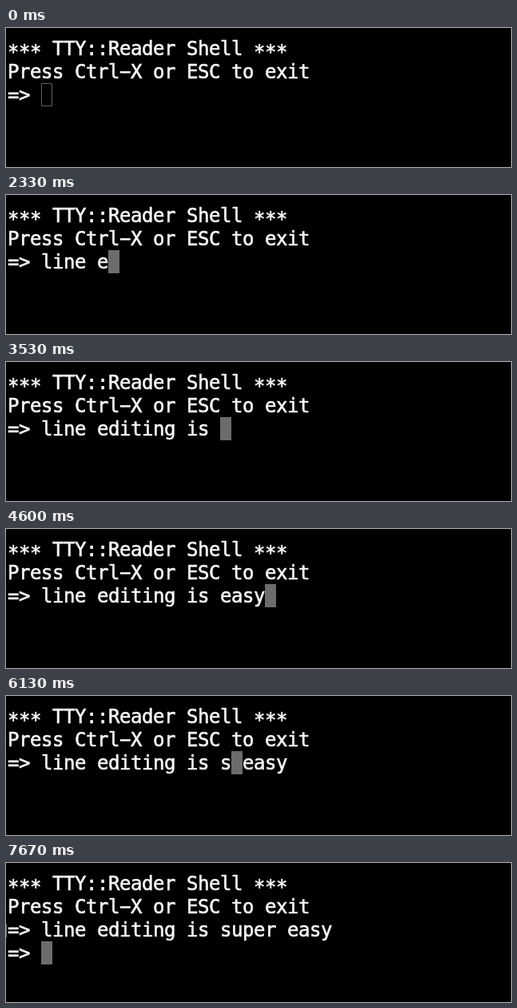
An HTML page with a canvas that plays this animation: 632x174 px, repeating every 8000 ms.

```html
<!DOCTYPE html>
<html lang="en">
<head>
<meta charset="utf-8">
<style>
  html, body { margin: 0; width: 100%; height: 100%; overflow: hidden; background: #000; }
  canvas { display: block; }
</style>
</head>
<body>
<canvas id="stage" width="632" height="174"></canvas>
<script>
const ctx = document.getElementById('stage').getContext('2d');
const LOOP = 8000, LEFT = 2, TOP = 11, CELL = 14, LINE = 29, BASELINE = 23;
const PROMPT = '=> ';
const FOCUS = 470, SUBMIT = 7600, POINTER = 7670;

// [time, keys]: '<' moves the cursor left, anything else is inserted
const KEYS = [
  [1470, 'li'], [1530, 'n'], [2000, 'e'], [2130, ' '], [2330, 'e'],
  [2530, 'd'], [2600, 'i'], [2730, 't'], [2800, 'i'], [2930, 'ng'], [3000, ' '],
  [3270, 'i'], [3330, 's'], [3530, ' '],
  [3730, 'e'], [3800, 'a'], [3930, 's'], [4070, 'y'],
  [4730, '<'], [4930, '<'], [5000, '<'], [5130, '<'], [5270, '<'],
  [5800, ' '], [6130, 's'], [6270, 'up'], [6330, 'e'], [6470, 'r'],
];

function editLine(time) {
  let text = '', pos = 0;
  for (const [at, keys] of KEYS) {
    if (at > time) break;
    for (const key of keys) {
      if (key === '<') { pos--; continue; }
      text = text.slice(0, pos) + key + text.slice(pos);
      pos++;
    }
  }
  return { text, pos };
}

function print(text, row) {
  ctx.fillStyle = ctx.strokeStyle = '#f8f8f8';
  ctx.lineWidth = 0.6; // slightly heavier than the regular weight
  [...text].forEach((char, col) => {
    const x = LEFT + col * CELL;
    const y = TOP + row * LINE + BASELINE + (char === '*' ? 3.5 : 0); // asterisks sit mid-line
    ctx.fillText(char, x, y);
    ctx.strokeText(char, x, y);
  });
}

function drawCursor(col, row, focused) {
  const x = LEFT + col * CELL, y = TOP + row * LINE;
  ctx.fillStyle = ctx.strokeStyle = focused ? '#6c6c6c' : '#606060';
  ctx.lineWidth = 1;
  if (focused) ctx.fillRect(x, y, CELL, LINE);
  else ctx.strokeRect(x + 0.5, y + 0.5, CELL - 1, LINE - 1);
}

function draw(time) {
  const { text, pos } = editLine(time);
  const submitted = time >= SUBMIT;
  ctx.fillStyle = '#000';
  ctx.fillRect(0, 0, 632, 174);
  ctx.font = '24px "DejaVu Sans Mono", monospace';
  ctx.lineJoin = 'round';
  drawCursor(PROMPT.length + (submitted ? 0 : pos), submitted ? 3 : 2, time >= FOCUS);
  print('*** TTY::Reader Shell ***', 0);
  print('Press Ctrl\u2212X or ESC to exit', 1);
  print(PROMPT + text, 2);
  if (submitted) print(PROMPT, 3);
  if (time >= POINTER) {
    // edge of the mouse pointer
    ctx.fillStyle = '#777';
    ctx.fillRect(0, 76, 1, 17);
  }
}

function tick() {
  draw(performance.now() % LOOP);
  requestAnimationFrame(tick);
}
tick();
</script>
</body>
</html>
```
